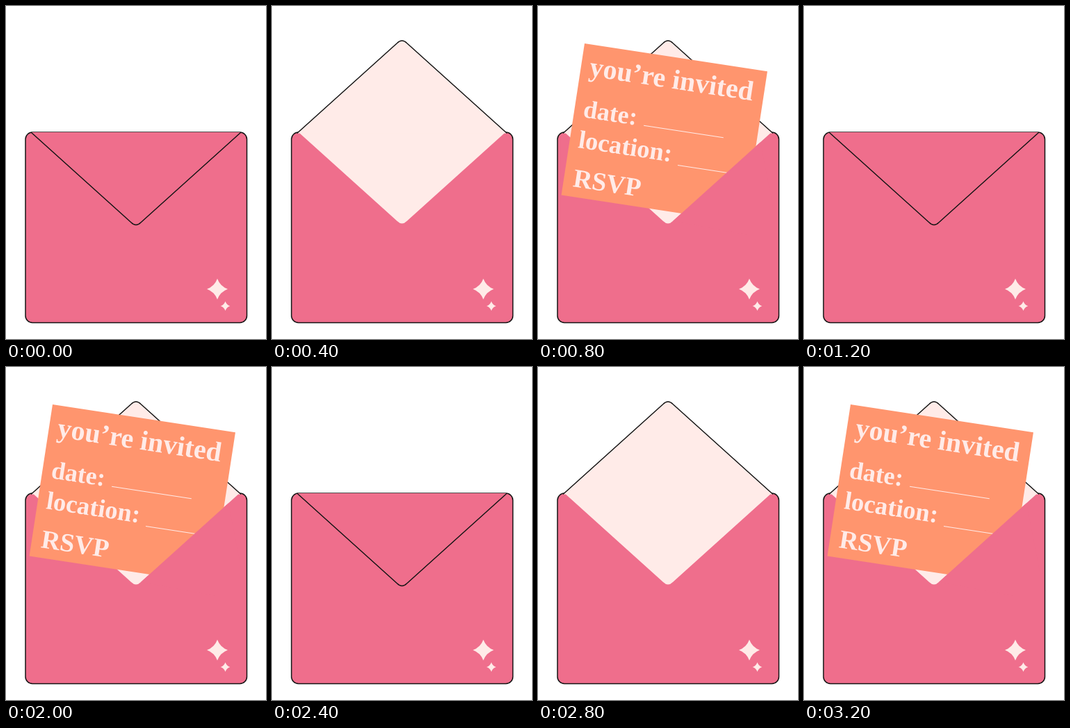
Write an HTML page that moves like this. It is 374 by 480 pixels and loops after 3600 ms.

```html
<!DOCTYPE html>
<html lang="en">
<head>
<meta charset="utf-8">
<title>Invitation</title>
<style>
  html, body { margin: 0; width: 100%; height: 100%; overflow: hidden; background: #fff; }
  svg { display: block; width: 374px; height: 480px; }
  .pink { fill: #ef6e8c; }
  .pale { fill: #ffebe8; }
  .ink { stroke: #141414; stroke-width: 1.5; stroke-linejoin: round; }
  .rule { stroke: #ffebe8; stroke-width: 1.1; }
  text { font: bold 36px "Liberation Serif", "Times New Roman", serif; fill: #ffebe8; }
  .title { font-size: 40px; }
  .place { font-size: 36.6px; }
  .reply { font-size: 37.6px; }
</style>
</head>
<body>
<svg viewBox="0 0 374 480">
  <defs>
    <path id="flap" d="M36 182 L180 312 Q187 319 194 312 L338 182"/>
    <path id="star" d="M0-15 Q4-4 15 0 Q4 4 0 15 Q-4 4-15 0 Q-4-4 0-15Z"/>
  </defs>

  <rect class="pink ink" x="28" y="182" width="318.5" height="274.5" rx="10"/>

  <use id="closed" href="#flap" class="pink ink"/>

  <g id="open">
    <use href="#flap" class="pale" y="-2"/>
    <use href="#flap" class="pale ink" transform="matrix(1 0 0 -1 0 365.5)"/>
    <g id="card">
      <g transform="translate(67 54) rotate(8.7)">
        <rect width="266" height="221" fill="#ff956e"/>
        <text class="title" x="12.5" y="45">you’re invited</text>
        <text x="13" y="105.2">date:</text>
        <path class="rule" d="M102 104 H218"/>
        <text class="place" x="12.5" y="149.8">location:</text>
        <path class="rule" d="M159 153.2 H250"/>
        <text class="reply" x="13.5" y="206.3">RSVP</text>
      </g>
      <!-- right side of the pocket, in front of the card -->
      <path class="pink" d="M320 196.3 L194 310 L300 330 L340 300 Z"/>
    </g>
  </g>

  <use href="#star" class="pale" transform="translate(304 408)"/>
  <use href="#star" class="pale" transform="translate(315.5 432.5) scale(.45)"/>
</svg>
<script>
  const STEP = 400;
  const show = (id, on) => {
    document.getElementById(id).style.display = on ? "" : "none";
  };

  // closed, open, card out
  function draw() {
    const pose = Math.floor(performance.now() / STEP) % 3;
    show("closed", pose === 0);
    show("open", pose > 0);
    show("card", pose === 2);
    requestAnimationFrame(draw);
  }
  draw();
</script>
</body>
</html>
```
